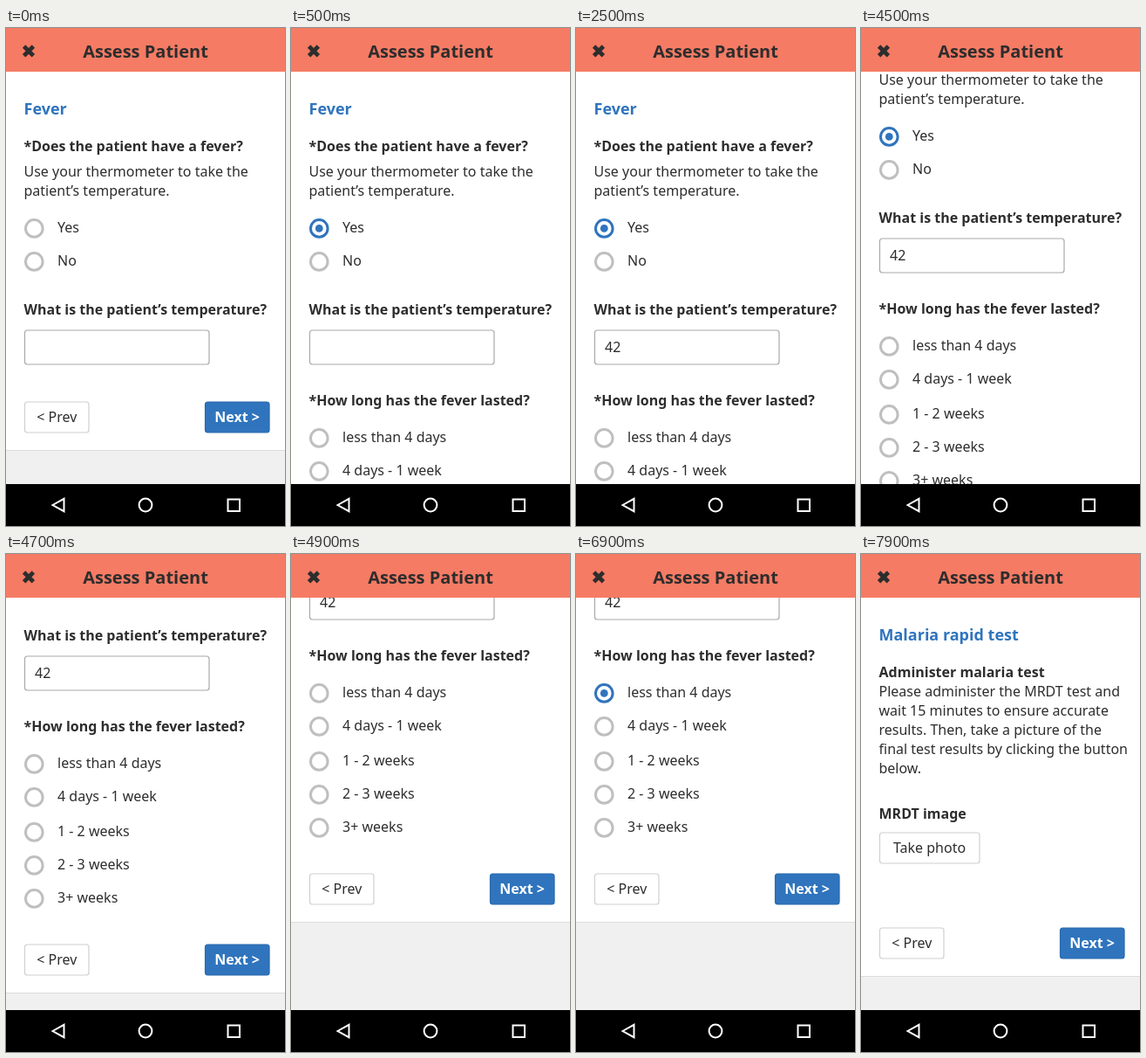
An HTML page for the animation above (8000 ms loop, 320 by 570 pixels).

```html
<!DOCTYPE html>
<html lang="en">
<head>
<meta charset="utf-8">
<title>Assess Patient</title>
<style>
  html, body { margin: 0; width: 100%; height: 100%; overflow: hidden; background: #fff; }
  svg { display: block; width: 320px; height: 570px; }
  text { font: 16px "Noto Sans", "Open Sans", sans-serif; fill: #2d2d2d; white-space: pre; }
  .bold { font-weight: 700; }
  .heading { font-weight: 700; font-size: 18px; fill: #2f74bd; }
  .title { font-weight: 700; font-size: 20px; }
  .mid { text-anchor: middle; }
  .white { fill: #fff; }
  .box { fill: #fff; stroke: #d0d0d0; stroke-width: 1.2; }
  .field { stroke: #a9a9a9; }
  .next { fill: #2f74bd; stroke: #2a69ac; }
  .ring { fill: #fff; stroke: #bfbfbf; stroke-width: 3; }
  .on .ring { stroke: #2f74bd; }
  .dot { fill: none; }
  .on .dot { fill: #2f74bd; }
  .nav { fill: none; stroke: #fff; stroke-width: 2; }
</style>
</head>
<body>
<svg viewBox="0 0 320 570">
  <g id="fever"></g>
  <g id="malaria"></g>
  <g id="footer"></g>
  <rect width="320" height="50" fill="#f57b64"/>
  <path d="M20.6 21l10.8 10.8M31.4 21L20.6 31.8" stroke="#2d2d2d" stroke-width="4.8"/>
  <text class="title mid" x="160" y="34">Assess Patient</text>
  <rect y="522" width="320" height="48"/>
  <g class="nav">
    <path d="M53.5 546L66.5 538.8V553.2Z"/>
    <circle cx="160" cy="546" r="7.4"/>
    <rect x="254.5" y="539.5" width="13.5" height="13.5"/>
  </g>
</svg>
<script>
const el = id => document.getElementById(id);
const text = (x, y, str, cls = "") => `<text x="${x}" y="${y}" class="${cls}">${str}</text>`;
const line = (y, str, cls) => text(20.5, y, str, cls);
const box = (x, y, w, h, cls = "") =>
  `<rect x="${x}" y="${y}" width="${w}" height="${h}" rx="3" class="box ${cls}"/>`;
const radio = (y, label, id = "") =>
  `<g id="${id}"><circle class="ring" cx="32.3" cy="${y + 0.4}" r="9.8"/>` +
  `<circle class="dot" cx="32.3" cy="${y + 0.4}" r="4.4"/>${text(59, y + 5, label)}</g>`;

el("fever").innerHTML =
  line(99, "Fever", "heading") +
  line(141, "*Does the patient have a fever?", "bold") +
  line(170, "Use your thermometer to take the") +
  line(192, "patient’s temperature.") +
  radio(229, "Yes", "yes") + radio(267, "No") +
  line(328, "What is the patient’s temperature?", "bold") +
  box(21.5, 346, 211.5, 39, "field") +
  `<g id="reading">${text(33, 371, "42")}</g><g id="duration">` +
  line(432, "*How long has the fever lasted?", "bold") +
  radio(469, "less than 4 days", "short") + radio(507, "4 days - 1 week") +
  radio(547, "1 - 2 weeks") + radio(585, "2 - 3 weeks") + radio(623, "3+ weeks") + "</g>";

el("malaria").innerHTML =
  line(99, "Malaria rapid test", "heading") +
  line(141, "Administer malaria test", "bold") +
  ["Please administer the MRDT test and", "wait 15 minutes to ensure accurate",
   "results. Then, take a picture of the", "final test results by clicking the button",
   "below."].map((str, i) => line(163 + 22 * i, str)).join("") +
  line(303, "MRDT image", "bold") +
  box(21.5, 319, 114.5, 35) + text(78.5, 342, "Take photo", "mid");

el("footer").innerHTML =
  box(21.5, 428, 73.5, 35) + text(58.3, 451, "&lt; Prev", "mid") +
  box(228.5, 428, 73.5, 35, "next") + text(265.2, 451, "Next &gt;", "bold mid white") +
  '<rect y="483" width="320" height="300" fill="#f0f0f0"/>' +
  '<rect y="483" width="320" height="1" fill="#dcdcdc"/>';

const show = (id, on) => el(id).style.display = on ? "" : "none";
const shift = (id, y) => el(id).setAttribute("transform", `translate(0 ${y})`);

function draw(now) {
  const t = now % 8000;
  const lastPage = t >= 7900;
  const answered = t >= 500;
  const scroll = t < 4500 ? 0 : t < 4700 ? 105 : t < 4900 ? 229 : 310;
  show("fever", !lastPage);
  show("malaria", lastPage);
  show("duration", answered);
  show("reading", t >= 2500);
  el("yes").classList.toggle("on", answered);
  el("short").classList.toggle("on", t >= 6900);
  shift("fever", -scroll);
  shift("footer", answered && !lastPage ? 248 - scroll : 0);
  requestAnimationFrame(draw);
}
draw(0);
</script>
</body>
</html>
```
